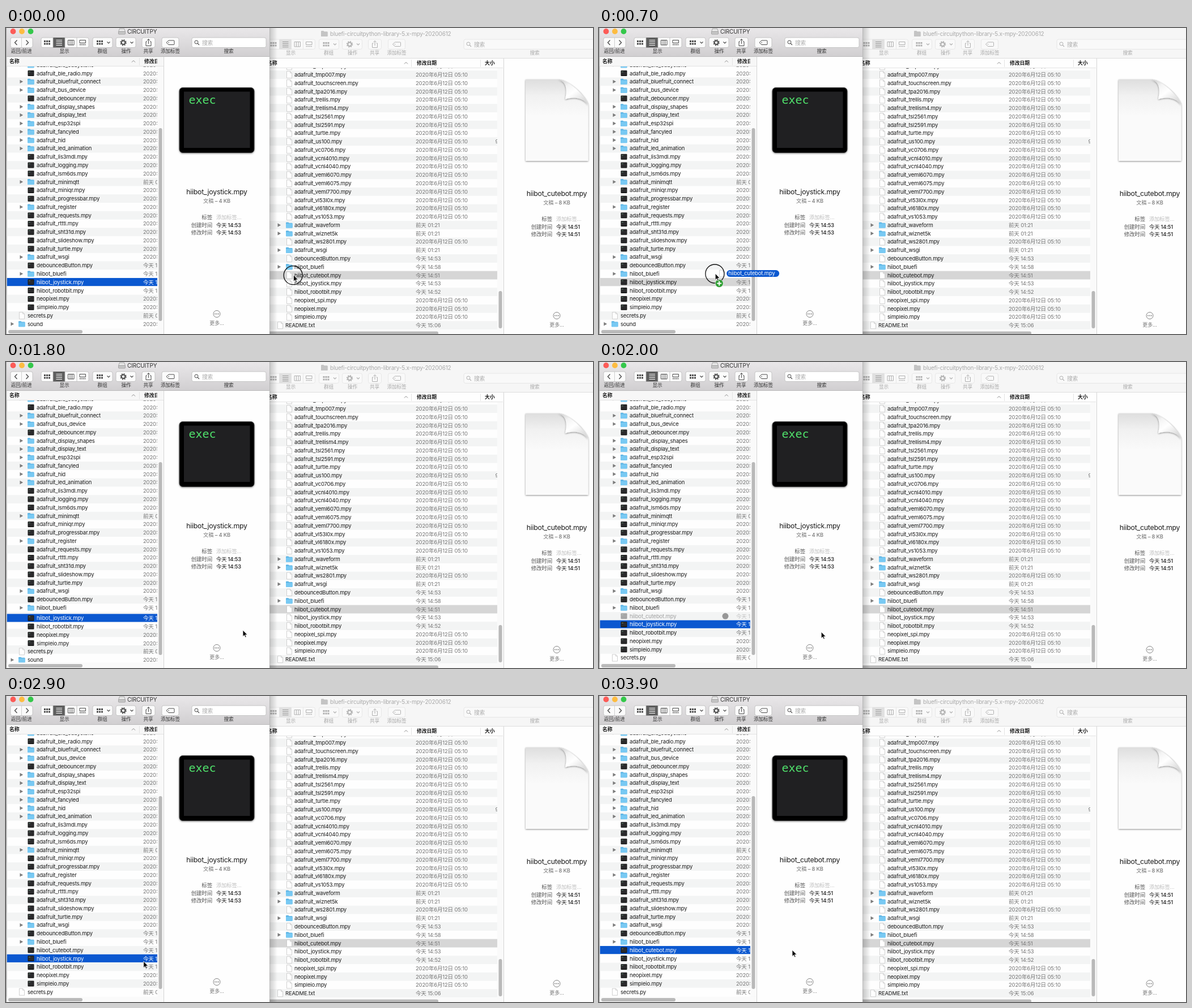
Recreate the animation shown at these times as an HTML page. Size 1036 by 541 pixels, loop 4 s.

```html
<!DOCTYPE html>
<html lang="zh-CN">
<head>
<meta charset="utf-8">
<style>
html, body { margin: 0; width: 100%; height: 100%; overflow: hidden; background: #fff; }
svg { display: block; width: 1036px; height: 541px; }
text { font-family: Inter, "Noto Sans CJK SC", "Noto Sans CJK", sans-serif; font-size: 9.5px; letter-spacing: -.018em; white-space: pre; }
.exec { font-family: "DejaVu Sans Mono", monospace; font-size: 20px; letter-spacing: 0; fill: #50e36c; }
</style>
</head>
<body>
<svg id="stage" viewBox="0 0 1036 541"></svg>
<script>
const PITCH = 14.77, LOOP = 4000, STEP = 100;
const LEFT_Y = 80.1, RIGHT_Y = 82.6, BLUE = '#0b58d0', IDLE = '#d6d6d6', INK = '#1a1a1a';

const rect = (x, y, w, h, fill, more = '') =>
  `<rect x="${x}" y="${y}" width="${w}" height="${h}" fill="${fill}" ${more}/>`;
const line = (d, color, w = 1, more = '') =>
  `<path d="${d}" fill="none" stroke="${color}" stroke-width="${w}" ${more}/>`;
const shape = (d, fill, more = '') => `<path d="${d}" fill="${fill}" ${more}/>`;
const disc = (x, y, r, fill, more = '') =>
  `<circle cx="${x}" cy="${y}" r="${r}" fill="${fill}" ${more}/>`;
// y is the middle of the line
const text = (x, y, s, { size = 9.5, fill = INK, anchor = 'start', weight = 400, id = '' } = {}) =>
  `<text ${id && `id="${id}"`} x="${x}" y="${y + size * .36}" text-anchor="${anchor}" font-weight="${weight}" style="font-size:${size}px;fill:${fill}">${s}</text>`;
const group = (body, more = '') => `<g ${more}>${body}</g>`;

const icons = {
  dir: (x, y) =>
    shape(`M${x - 6} ${y - 4}q0-1 1-1h3.4l1.2 1.2h5q1 0 1 1V${y + 4}q0 1-1 1h-9.6q-1 0-1-1z`, '#5db4e4') +
    rect(x - 6, y - 2.6, 11.6, 7.6, '#78c9f3', 'rx=".8"'),
  exe: (x, y) =>
    rect(x - 5.5, y - 5, 11, 10, '#161616', 'rx="1"') +
    rect(x - 4.5, y - 4, 9, 7.5, '#2b2b2d') + rect(x - 4, y - 3, 3, 1, '#58806a'),
  doc: (x, y) =>
    shape(`M${x - 4.5} ${y - 6}h6l3 3v9h-9z`, '#fff', 'stroke="#c4c4c4" stroke-width=".8"') +
    line(`M${x + 1.5} ${y - 6}v3h3`, '#c4c4c4', .8)
};
const arrow = (x, y) => shape(`M${x - 2.5} ${y - 3.2}l5.6 3.2l-5.6 3.2z`, '#7b7b7b');

// entries: "+" marks a folder, "^" a top-level item
const parse = s => ({ dir: s.includes('+'), top: s.includes('^'), name: s.replace(/[+^]/g, '') });

function fileRow(entry, y, col, date, file, id = '') {
  const { dir, top, name } = parse(entry), dx = top ? -16 : 0;
  return (dir ? arrow(col.tri + dx, y) : '') +
    icons[dir ? 'dir' : top ? 'doc' : file](col.icon + dx, y) +
    text(col.name + dx, y, name, { id: id && id + 'Name' }) +
    text(col.date, y, date, { fill: '#757575', id: id && id + 'Date' });
}

const af = s => s.split(' ').map(n => (n[0] === '+' ? '+adafruit_' + n.slice(1) : 'adafruit_' + n + '.mpy'));
const leftFiles = [
  ...af('+ble_eddystone ble_radio +bluefruit_connect +bus_device debouncer +display_shapes +display_text +esp32spi +fancyled +hid +led_animation lis3mdl logging lsm6ds +minimqtt miniqr progressbar +register requests rtttl sht31d slideshow turtle +wsgi'),
  'debouncedButton.mpy', '+hiibot_bluefi', 'hiibot_joystick.mpy', 'hiibot_robotbit.mpy',
  'neopixel.mpy', 'simpleio.mpy', '^secrets.py', '^+sound'];
const rightFiles = [
  ...af('tmp006 tmp007 touchscreen tpa2016 trellis trellism4 tsl2561 tsl2591 turtle us100 vc0706 vcnl4010 vcnl4040 veml6070 veml6075 veml7700 vl53l0x vl6180x vs1053 +waveform +wiznet5k ws2801 +wsgi'),
  'debouncedButton.mpy', '+hiibot_bluefi', 'hiibot_cutebot.mpy', 'hiibot_joystick.mpy', 'hiibot_robotbit.mpy',
  'neopixel_spi.mpy', 'neopixel.mpy', 'simpleio.mpy', '^README.txt'];

const OLD = '2020年6月12日 05:10';
const rightDates = { debounced: '今天 14:53', hiibot_bluefi: '今天 14:58', cutebot: '今天 14:51', joystick: '今天 14:53', robotbit: '今天 14:52', README: '今天 15:06', waveform: '前天 01:21', wiznet: '前天 01:21', wsgi: '前天 01:21' };
const rightDate = n => rightDates[Object.keys(rightDates).find(k => n.includes(k))] || OLD;
const leftDate = n => /debounced|hiibot/.test(n) ? '今天 14:53' : /minimqtt|secrets/.test(n) ? '前天 01:21' : OLD;

const stripes = (first, y0, x, w) => {
  let s = '';
  for (let i = first; i < 31; i += 2) s += rect(x, y0 + (i - .5) * PITCH, w, PITCH, '#f3f4f4');
  return s;
};

function toolbar(dx, dy, on, searchX, searchW, labelX) {
  const ink = on ? '#4a4a4a' : '#b0b0b0', edge = on ? '#bcbcbc' : '#e2e2e2', face = on ? '#fbfbfb' : '#f9f9f9';
  const button = (x, w, fill = face) => rect(x, 17, w, 17.5, fill, `rx="3" stroke="${edge}" stroke-width=".8"`);
  const label = (x, s) => text(x, 41, s, { size: 8.7, anchor: 'middle', fill: on ? '#333' : '#a8a8a8' });
  const chevron = x => line(`M${x - 2.5} 24.5l2.5 2.5l2.5-2.5`, ink, 1.2);
  const tiles = (x, y) => {
    let s = '';
    for (let i = 0; i < 6; i++) s += rect(x + i % 3 * 4, y + (i > 2 ? 4.5 : 0), 3, 3, ink);
    return s;
  };
  let s = button(62, 84);
  s += rect(83, 17, 21, 17.5, on ? '#5e5e5e' : '#e0e0e0');
  s += line('M83 17v17.5M104 17v17.5M125 17v17.5', edge, .8);
  s += tiles(67, 22);
  s += line('M88.5 21.5h10.5M88.5 24.5h10.5M88.5 27.5h10.5M88.5 30.5h10.5', on ? '#fff' : '#999', 1.1);
  s += line('M109.5 21.5h10.5v8.5h-10.5zM113 21.5v8.5M116.5 21.5v8.5', ink, 1);
  s += line('M130 21.5h10.5v5h-10.5z', ink, 1) + line('M130 29.5h10.5', ink, 1.6, 'stroke-dasharray="2 .9"');
  s += button(153, 35) + tiles(160, 22) + chevron(181);
  s += button(194, 35) + disc(207, 25.8, 3.3, 'none', `stroke="${ink}" stroke-width="2"`) +
    disc(207, 25.8, 5, 'none', `stroke="${ink}" stroke-width="1.5" stroke-dasharray="2 1.93"`) + chevron(222);
  s += button(240, 23) + line('M249 24h-2v7.5h9v-7.5h-2M251.5 28v-8M249 22l2.5-2.5l2.5 2.5', ink, 1);
  s += button(275, 30) + line('M287 22h9q1 0 1 1v5.5q0 1-1 1h-9l-4-3.75z', ink, 1) + disc(287, 25.8, .8, ink);
  s += label(103, '显示') + label(170, '群组') + label(212, '操作') + label(251, '共享') + label(290, '添加标签');
  let search = rect(searchX, 17, searchW, 17.5, on ? '#fff' : '#f9f9f9', `rx="3" stroke="${edge}" stroke-width=".8"`);
  search += disc(searchX + 8, 25, 3, 'none', `stroke="${ink}"`) + line(`M${searchX + 10.2} 27.2l2.8 2.8`, ink, 1.2);
  search += text(searchX + 18, 26, '搜索', { fill: '#aaa', size: 9.8 }) + label(labelX, '搜索');
  return group(s, `transform="translate(${dx} ${dy})"`) + group(search, `transform="translate(0 ${dy})"`);
}

function details(cx, y, name, size, time, key) {
  const row = (dy, k, v, fill, id) =>
    text(cx - 8, y + dy, k, { anchor: 'end', fill: '#555' }) +
    text(cx - 1, y + dy, v, { fill, size: 9.3, weight: id ? 500 : 400, id });
  return text(cx, y, name, { size: 12.3, anchor: 'middle', id: key + 'Title' }) +
    text(cx, y + 15.5, size, { size: 9.3, anchor: 'middle', weight: 500, fill: '#777', id: key + 'Size' }) +
    row(45, '标签', '添加标签…', '#bdbdbd', '') +
    row(58.3, '创建时间', time, INK, key + 'Made') + row(71.5, '修改时间', time, INK, key + 'Edit') +
    disc(cx, y + 215.5, 6, 'none', 'stroke="#777" stroke-width=".9"') +
    [-3, 0, 3].map(d => disc(cx + d, y + 215.5, .9, '#777')).join('') +
    text(cx, y + 231.5, '更多…', { anchor: 'middle', fill: '#777', size: 9 });
}

const caret = (x, y) => line(`M${x - 3} ${y + 1.5}l3-3l3 3`, '#8a8a8a', 1);
const head = (x, y, s) => text(x, y, s, { size: 8.9, weight: 600 });

function rightWindow() {
  const col = { tri: 482, icon: 500, name: 509, date: 723 };
  let s = rect(460, 0, 576, 541, '#fefefe') + rect(460, 0, 576, 53.5, '#f6f6f6') + line('M460 53.5H1036', '#d6d6d6', .8);
  s += icons.dir(562, 10).replace(/#\w{6}/g, '#c4c4c4') +
    text(572, 10, 'bluefi-circuitpython-library-5.x-mpy-20200612', { size: 10, fill: '#a9a9a9' });
  s += toolbar(399.5, 3, false, 808, 240, 933);
  let list = stripes(0, RIGHT_Y, 460, 407) + rect(460, RIGHT_Y + 23.5 * PITCH, 407, PITCH, IDLE);
  rightFiles.forEach((f, i) => list += fileRow(f, RIGHT_Y + (i - 1) * PITCH, col, rightDate(f), 'doc'));
  list += text(863.5, RIGHT_Y + 8 * PITCH, '9', { fill: '#757575' });
  s += group(list, 'clip-path="url(#rightClip)"');
  s += head(461, 62, '名称') + caret(706, 62) + head(725, 62, '修改日期') + head(845, 62, '大小');
  s += line('M460 70.5H877M715.5 56v13M837.5 56v13', '#dedede', .8);
  s += rect(867, 71, 11, 470, '#fafafa') + rect(869.5, 465, 6, 66, '#b9b9b9', 'rx="3"');
  s += rect(460, 534, 418, 7, '#fafafa') + rect(400, 536.5, 363, 6, '#b9b9b9', 'rx="3"');
  s += rect(878, 54, 158, 487, '#fefefe') + line('M878.5 54V541', '#d4d4d4');
  s += shape('M917 91H974C992 92 1027 122 1027.5 137V235H917Z', 'url(#paper)', 'filter="url(#soft)"');
  s += shape('M974 91C991 95 990 111 987 126C1001 121 1020 123 1027.5 137C1022 119 994 92 974 91Z', 'url(#fold)', 'filter="url(#soft)"');
  return s + details(972, 293, 'hiibot_cutebot.mpy', '文稿 – 8 KB', '今天 14:51', 'r');
}

function leftWindow() {
  const col = { tri: 27, icon: 44, name: 54, date: 242 };
  const y = i => LEFT_Y + (i - 1) * PITCH, cut = 26;
  let s = rect(465, 0, 14, 541, 'url(#edge)') + rect(0, 0, 465.5, 541, '#a9a9a9') + rect(1.5, 0, 463.5, 541, '#fefefe');
  s += rect(1.5, 0, 463.5, 50, 'url(#bar)') + line('M1 50.5H465', '#b4b4b4', .9);
  s += ['#fc5b57', '#fdbc40', '#34c84a'].map((c, i) => disc(12.5 + i * 15.5, 6, 4.9, c)).join('');
  s += shape('M200.5 1h8l2 5.5h-12z', '#e4e4e4', 'stroke="#8c8c8c" stroke-width=".7"') +
    rect(198.5, 6.5, 12, 4.5, '#c8c8c8', 'rx="1" stroke="#8c8c8c" stroke-width=".7"');
  s += text(214, 6, 'CIRCUITPY', { size: 10.1, fill: '#333' });
  s += rect(8, 17, 39, 17.5, '#fbfbfb', 'rx="3" stroke="#bcbcbc" stroke-width=".8"') + line('M27.5 17v17.5', '#c4c4c4', .8);
  s += line('M19.5 21.5l-4 4.25l4 4.25M35.5 21.5l4 4.25l-4 4.25', '#444', 1.3);
  s += text(27, 41, '返回/前进', { size: 8.7, anchor: 'middle', fill: '#333' });
  s += toolbar(0, 0, true, 328, 131, 393);

  let list = stripes(1, LEFT_Y, 1.5, 265.5);
  leftFiles.slice(0, cut).forEach((f, i) => list += fileRow(f, y(i), col, leftDate(f), 'exe'));
  list += rect(1.5, y(cut) - PITCH / 2, 265.5, PITCH - .6, BLUE, 'id="sel"');
  let tail = '';
  leftFiles.slice(cut).forEach((f, i) => tail += fileRow(f, y(cut + i), col, leftDate(f), 'exe', i ? '' : 'joy'));
  list += group(tail, 'id="tail"');
  list += group(fileRow('hiibot_cutebot.mpy', y(cut), col, '今天 14:51', 'exe', 'cute'), 'id="fresh"');
  list += disc(223, y(cut), 5.5, '#979797', 'id="busy"');
  s += group(list, 'clip-path="url(#leftClip)"');

  s += rect(1.5, 51, 276, 16.5, '#f7f7f7');
  s += head(6, 59, '名称') + caret(225, 59) + group(head(244, 59, '修改日期'), 'clip-path="url(#headClip)"');
  s += line('M1.5 67.5H278M235.5 53v13', '#dedede', .8);
  s += rect(267, 68, 11, 473, '#fafafa') + rect(269.5, 177, 6, 341, '#b9b9b9', 'rx="3"');
  s += rect(1.5, 531.5, 276, 9.5, '#fafafa') + rect(4, 534, 131, 6, '#b9b9b9', 'rx="3"');
  s += rect(278, 51, 187, 490, '#fefefe') + line('M278.5 51V541', '#d4d4d4');
  s += rect(306, 105.5, 132, 115, '#060606', 'rx="6" stroke="#3a3a3a" filter="url(#soft)"') + rect(314, 112.5, 116.5, 99.5, '#202022');
  s += '<text class="exec" x="322.5" y="134">exec</text>';
  return s + details(372, 290, 'hiibot_joystick.mpy', '文稿 – 4 KB', '今天 14:53', 'l');
}

const grad = (id, x2, y2, ...stops) =>
  `<linearGradient id="${id}" x2="${x2}" y2="${y2}">` +
  stops.map(([o, c, a = 1]) => `<stop offset="${o}" stop-color="${c}" stop-opacity="${a}"/>`).join('') + '</linearGradient>';
const clip = (id, x, y, w, h) => `<clipPath id="${id}">${rect(x, y, w, h, '#000')}</clipPath>`;

const defs = '<defs>' +
  grad('bar', 0, 1, [0, '#e9e7e9'], [1, '#d1cfd1']) +
  grad('edge', 1, 0, [0, '#000', .2], [1, '#000', 0]) +
  grad('paper', 0, 1, [0, '#dedede'], [.2, '#f1f1f1'], [.45, '#fafafa'], [1, '#fafafa']) +
  grad('fold', .8, 1, [0, '#c9c9c9'], [.3, '#f4f4f4'], [.55, '#fff'], [1, '#d4d4d4']) +
  clip('leftClip', 1.5, 68, 265.5, 463.5) + clip('rightClip', 460, 71, 407, 463) + clip('headClip', 236, 51, 31, 16) +
  '<filter id="soft" x="-10%" y="-10%" width="120%" height="120%"><feDropShadow dx="0" dy="1" stdDeviation="1.5" flood-opacity=".45"/></filter></defs>';

const pointer =
  group(icons.doc(-8, 0) + rect(0, -6, 93, 12, BLUE, 'rx="6"') + text(3, 0, 'hiibot_cutebot.mpy', { fill: '#fff' }), 'id="drag"') +
  disc(0, 0, 16.5, 'none', 'id="ring" stroke="#111" stroke-width="1.3"') +
  group(disc(7, 17.5, 7, '#2f9e33', 'stroke="#fff" stroke-width=".6"') + line('M3 17.5h8M7 13.5v8', '#fff', 2), 'id="plus"') +
  shape('M0 0V11.5L2.6 9L4.4 13L6.2 12.2L4.5 8.3H8Z', '#0a0a0a', 'id="mouse" stroke="#fff" stroke-width=".8"');

const stage = document.getElementById('stage');
stage.innerHTML = defs + rightWindow() + leftWindow() + pointer;
const el = id => document.getElementById(id);
const show = (id, on) => el(id).style.display = on ? '' : 'none';
const move = (id, x, y) => el(id).setAttribute('transform', `translate(${x} ${y})`);
const put = (id, s) => { if (el(id).textContent !== s) el(id).textContent = s; };

// time, x, y of the pointer tip
const path = [[0, 507.5, 436.7], [100, 505, 437], [400, 342, 416], [900, 114, 446], [1200, 104.5, 449], [1400, 106, 449],
  [1800, 418, 474], [2400, 318.5, 486], [3400, 167, 452], [3600, 152, 450], [3900, 341, 449], [4000, 341, 449]];
const clamp = v => Math.max(0, Math.min(1, v));
const ease = v => v * v * (3 - 2 * v);

function mouseAt(t) {
  const i = path.findIndex((p, n) => n && t <= p[0]), a = path[i - 1], b = path[i];
  let k = (t - a[0]) / (b[0] - a[0]);
  if (t > 1200) k = ease(k);
  return [a[1] + (b[1] - a[1]) * k, a[2] + (b[2] - a[2]) * k];
}

function draw(t) {
  const [x, y] = mouseAt(t);
  const held = t < 1300, dragging = held && t >= 100, inList = dragging && x < 267;
  const picked = t >= 3600, loaded = t >= 3700;
  const shift = PITCH * ease(clamp((t - 1700) / 320));

  move('mouse', x, y);
  show('ring', held);
  move('ring', x - .8, y + .5);
  el('ring').setAttribute('r', t < 1200 ? 16.5 : 29.5);
  show('drag', dragging);
  move('drag', x + 20 - 28.5 * ease(clamp((t - 700) / 300)), y);
  el('drag').setAttribute('opacity', inList ? 1 : .72);
  show('plus', inList);
  move('plus', x, y);

  move('tail', 0, shift);
  move('sel', 0, picked ? 0 : shift);
  el('sel').setAttribute('fill', inList ? IDLE : BLUE);
  const joyOn = !inList && !picked;
  el('joyName').style.fill = joyOn ? '#fff' : INK;
  el('joyDate').style.fill = joyOn ? '#fff' : '#757575';
  el('cuteName').style.fill = picked ? '#fff' : INK;
  el('cuteDate').style.fill = picked ? '#fff' : '#757575';
  const copying = t >= 2000 && t < 2900;
  show('fresh', t >= 2000);
  el('fresh').setAttribute('opacity', copying ? .38 : 1);
  show('busy', copying);

  put('lTitle', loaded ? 'hiibot_cutebot.mpy' : 'hiibot_joystick.mpy');
  put('lSize', loaded ? '文稿 – 8 KB' : '文稿 – 4 KB');
  const time = loaded ? '今天 14:51' : '今天 14:53';
  put('lMade', time);
  put('lEdit', time);
}

const start = performance.now();
function tick() {
  const t = (performance.now() - start) % LOOP;
  draw(Math.floor(t / STEP) * STEP);
  requestAnimationFrame(tick);
}
tick();
</script>
</body>
</html>
```
